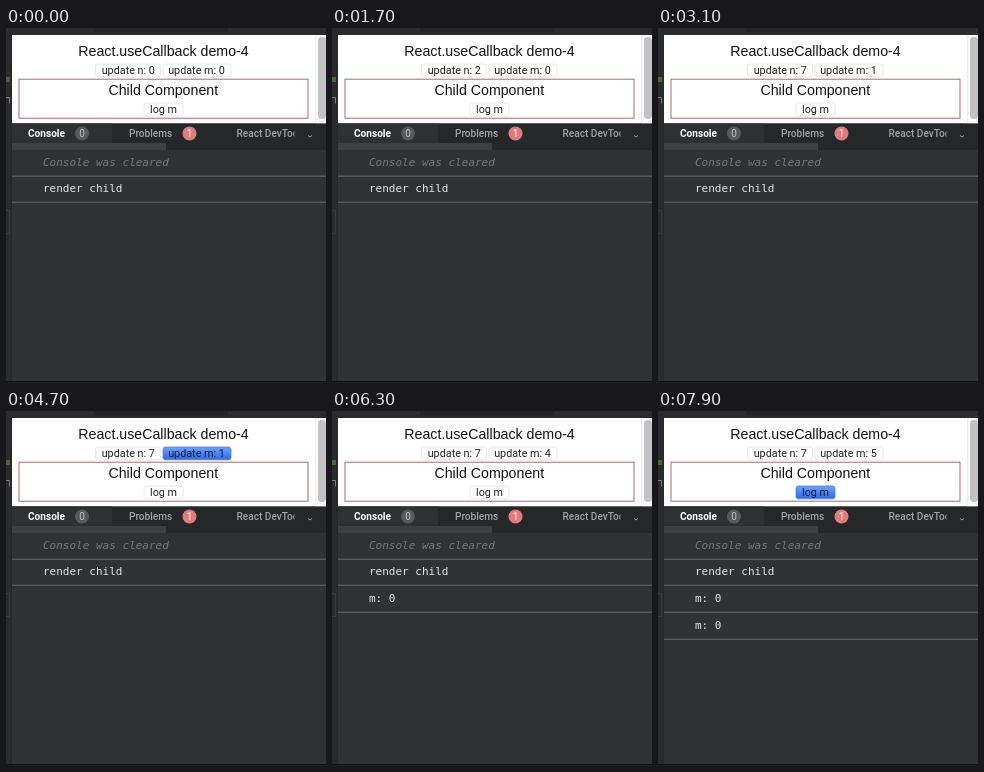
An HTML page that plays this animation: 320x355 px, repeating every 8 s.

```html
<!DOCTYPE html>
<html lang="en">
<head>
<meta charset="utf-8">
<title>useCallback demo</title>
<style>
  html, body { margin: 0; width: 100%; height: 100%; overflow: hidden; background: #303334; }
  svg { display: block; width: 320px; height: 355px; }
  .heading { font: 14.2px "Liberation Sans", sans-serif; text-anchor: middle; fill: #111; }
  .button text { font: 10.8px Roboto, sans-serif; text-anchor: middle; fill: #222; }
  .button rect { fill: #fff; stroke: #e2e2e2; stroke-width: .8; }
  .pressed rect { fill: url(#blue); stroke: #4c82ea; }
  .pressed text { fill: #101c3c; }
  .tab { font: 500 10.1px Roboto, sans-serif; fill: #a0a2a3; }
  .active { font-weight: 700; fill: #fff; }
  .badge { font: 10px Roboto, sans-serif; text-anchor: middle; fill: #c4c4c4; }
  .log text { font: 11px "DejaVu Sans Mono", monospace; fill: #e4e5e5; }
  .log path { stroke: #66696a; }
  .log .cleared { font-style: italic; fill: #757879; }
</style>
</head>
<body>
<svg viewBox="0 0 320 355">
  <defs>
    <linearGradient id="blue" x2="0" y2="1">
      <stop stop-color="#6ea2f6"/>
      <stop offset="1" stop-color="#2f68e4"/>
    </linearGradient>
    <clipPath id="tabClip"><path d="M225 96h63.5v20h-63.5z"/></clipPath>
  </defs>

  <!-- editor edge and panel -->
  <path fill="#292b2c" d="M0 0h320v7H0zM0 0h6v355H0z"/>
  <path fill="#222425" d="M88 0h134v4H88z"/>
  <path fill="#3f6b3a" d="M0 49h4v5H0z"/>
  <path stroke="#7b7e7f" d="M0 69.5h3.5v6" fill="none"/>
  <path stroke="#393c3d" d="M0 182.5h3.5v23H0" fill="none"/>
  <path stroke="#252728" d="M5.5 7v346"/>
  <path fill="#121313" d="M0 353h320v1.5H0z"/>

  <!-- page preview -->
  <path fill="#fff" d="M6 7h314v88.5H6z"/>
  <path fill="#fafafa" d="M310 7h10v88.5h-10z"/>
  <path stroke="#ededed" d="M309.5 7v88.5"/>
  <rect x="312" y="9" width="8" height="82" rx="4" fill="#c2c2c2"/>
  <text class="heading" x="157.5" y="27.6">React.useCallback demo-4</text>
  <rect id="child" x="13" y="51.2" width="289" height="39" fill="none"/>
  <text class="heading" x="157.3" y="66.5">Child Component</text>
  <g class="button" id="n"><rect x="89.5" y="36" width="65" height="12.8" rx="2.5"/><text x="122.3" y="46"></text></g>
  <g class="button" id="m"><rect x="157" y="36" width="68" height="12.8" rx="2.5"/><text x="190.5" y="46"></text></g>
  <g class="button" id="log"><rect x="138" y="75" width="39" height="12.8" rx="2.5"/><text x="157.5" y="85">log m</text></g>

  <!-- console tabs and filter -->
  <path fill="#252728" d="M6 95.5h314V122H6z"/>
  <path fill="#2e3132" d="M6 95.5h100V115H6z"/>
  <path fill="#3d4041" d="M6 115h154v7H6z"/>
  <text class="tab active" x="22" y="109">Console</text>
  <circle cx="76" cy="105.5" r="7" fill="#57595a"/>
  <text class="badge" x="76" y="109">0</text>
  <text class="tab" x="123" y="109">Problems</text>
  <circle cx="183.5" cy="105.5" r="7" fill="#e27b7b"/>
  <text class="badge" x="183.5" y="109" style="fill:#fff">1</text>
  <text class="tab" x="230.5" y="109" clip-path="url(#tabClip)">React DevTools</text>
  <path d="M302 107.5l2 1.5 2-1.5" fill="none" stroke="#a0a2a3"/>

  <!-- console output -->
  <g class="log">
    <text class="cleared" x="37" y="138">Console was cleared</text>
    <path d="M6 148.2h314M6 174.2h314"/>
    <text x="37" y="163.9">render child</text>
    <g class="entry"><text x="37" y="190.9">m: 0</text><path d="M6 201.2h314"/></g>
    <g class="entry"><text x="37" y="217.9">m: 0</text><path d="M6 228.2h314"/></g>
  </g>
</svg>
<script>
const LOOP = 8000;
const byId = id => document.getElementById(id);
const entries = document.querySelectorAll('.entry');

// Times in ms: when each counter rises or entry appears, and [down, up] presses.
const counts = {
  n: [1500, 1700, 1900, 2000, 2200, 2300, 2500],
  m: [3100, 4800, 5100, 6300, 7400],
  log: [5700, 6800]
};
const presses = {
  n: [[1400, 1500], [1600, 1700], [1800, 1900], [2100, 2200], [2400, 2500]],
  m: [[2900, 3100], [4700, 4800], [5000, 5100], [6200, 6300], [7300, 7400]],
  log: [[5600, 5700], [6700, 6800], [7900, LOOP]]
};

const countAt = (id, t) => counts[id].filter(start => t >= start).length;

function draw(t) {
  for (const id in presses) {
    const pressed = presses[id].some(([down, up]) => t >= down && t < up);
    byId(id).classList.toggle('pressed', pressed);
  }
  for (const id of ['n', 'm']) {
    byId(id).lastChild.textContent = `update ${id}: ${countAt(id, t)}`;
  }
  entries.forEach((entry, i) => {
    entry.style.display = i < countAt('log', t) ? '' : 'none';
  });
  byId('child').style.stroke = t < 100 ? '#b06574' : '#a86d6c';
}

const start = performance.now();
function tick() {
  draw((performance.now() - start) % LOOP);
  requestAnimationFrame(tick);
}
tick();
</script>
</body>
</html>
```
